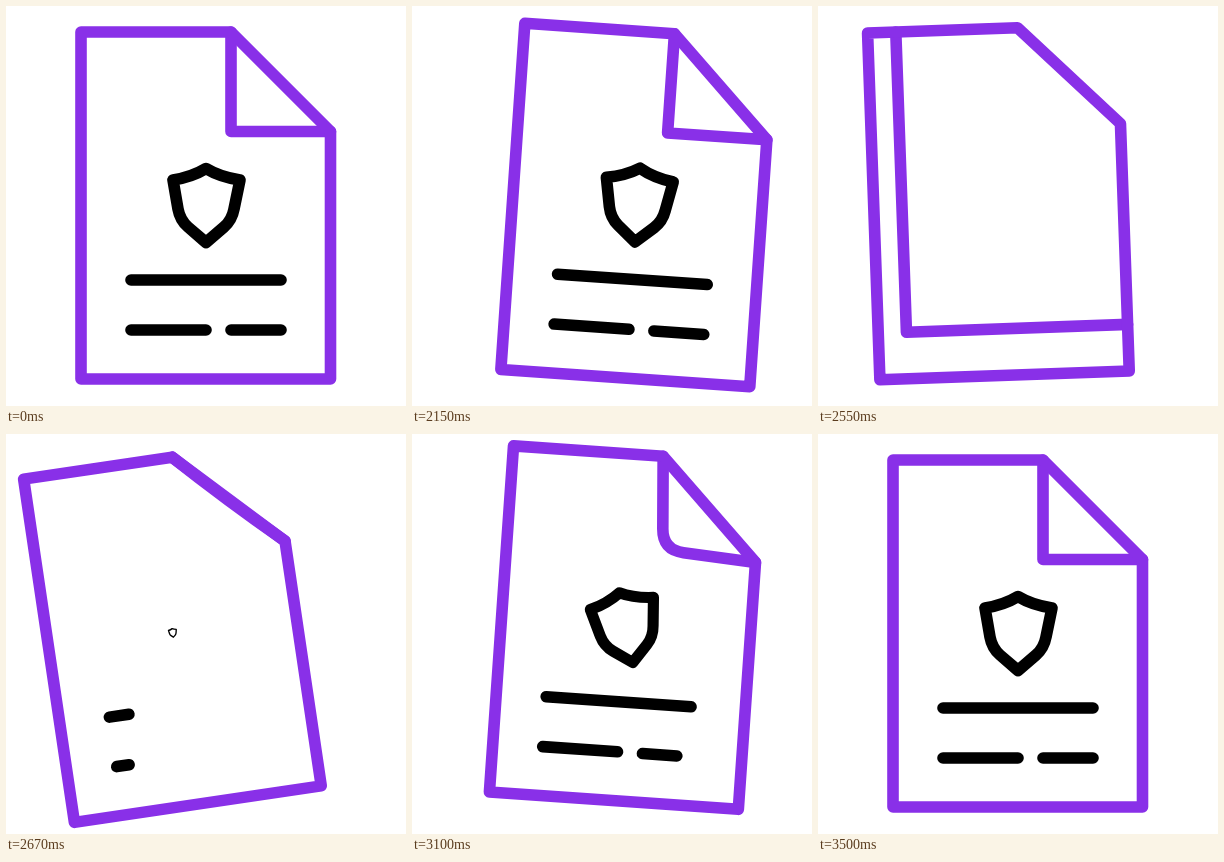
An HTML page with a canvas for the animation above (3520 ms loop, 400 px wide and 400 px high).

```html
<!DOCTYPE html>
<html lang="en">
<head>
<meta charset="utf-8">
<title>Secure document</title>
<style>
  html, body { margin: 0; width: 100%; height: 100%; overflow: hidden; background: #fff; }
  canvas { display: block; width: 100vw; height: 100vh; }
</style>
</head>
<body>
<canvas id="stage" width="400" height="400"></canvas>
<script>
const ctx = document.getElementById('stage').getContext('2d');
const LOOP = 3520, START = 2010, TURNED = 2637;
const PURPLE = '#8930e8', BLACK = '#000';
const LEFT = 75, TOP = 26, RIGHT = 324.5, BOTTOM = 373;
const FOLD_X = 225, FOLD_Y = 125.5;
const CENTER_X = (LEFT + RIGHT) / 2, CENTER_Y = (TOP + BOTTOM) / 2;

// Keyframes as [time, value]
const TRACKS = {
  x: [[1990, 0], [2330, 55.5], [2625, -33.3], [2777, -33.3], [3151, 16.6], [3500, 0]],
  y: [[1990, 0], [2330, -1], [2550, -3.5], [2850, 3.5], [3180, -7.5], [3500, 0]],
  angle: [[1990, 0], [2335, 8.8], [2712, -9], [3153, 4.5], [3500, 0]],
  turn: [[2327, 0], [TURNED, 1]],
  fold: [[2606, 0], [3239, 1]],
  round: [[2850, 1], [3212, 0]],
  shieldAngle: [[2750, 0], [3080, -15], [3500, 0]],
  shieldScale: [[TURNED, 0], [2800, 1.04], [3090, 0.96], [3500, 1]]
};

const shield = new Path2D(
  'M200 162.5Q186 171 167 174L172 203Q174 214 182 221L200 236.5' +
  'L218 221Q226 214 228 203L234 174Q214 171 200 162.5Z');

const mix = (a, b, k) => a + (b - a) * k;
const clamp = v => Math.min(1, Math.max(0, v));
const smooth = u => u * u * (3 - 2 * u);
const easeOut = (t, start, duration) => 1 - (1 - clamp((t - start) / duration)) ** 2.5;

function sample(keys, t) {
  let value = keys[0][1];
  for (let i = 1; i < keys.length; i++) {
    const [t0, v0] = keys[i - 1], [t1, v1] = keys[i];
    if (t >= t0) value = mix(v0, v1, smooth(clamp((t - t0) / (t1 - t0))));
  }
  return value;
}

function polyline(points, close) {
  ctx.beginPath();
  points.forEach(p => ctx.lineTo(...p));
  if (close) ctx.closePath();
}

function rule(x, y, length) {
  if (length <= 0) return;
  polyline([[x, y], [x + length, y]]);
  ctx.stroke();
}

function drawContent(scale, angle, first, second) {
  ctx.strokeStyle = BLACK;
  if (scale > 0) {
    ctx.save();
    ctx.translate(200, 200);
    ctx.rotate(angle * Math.PI / 180);
    ctx.scale(scale, scale);
    ctx.translate(-200, -200);
    ctx.stroke(shield);
    ctx.restore();
  }
  rule(125, 274, 150 * first);
  rule(125, 324, Math.min(75, 125 * second));
  rule(225, 324, 125 * second - 75);
}

function drawTurningFold(turn) {
  const x = mix(FOLD_X, LEFT, turn), y = mix(FOLD_Y, BOTTOM, turn);
  const edge = [[x, TOP], [x, y], [RIGHT, y]];
  polyline([...edge, [RIGHT, FOLD_Y], [FOLD_X, TOP]], true);
  ctx.fill();
  polyline(edge);
  ctx.strokeStyle = PURPLE;
  ctx.stroke();
}

function drawNewFold(fold, round) {
  const x = mix((FOLD_X + RIGHT) / 2, FOLD_X, fold);
  const y = mix((TOP + FOLD_Y) / 2, FOLD_Y, fold);
  ctx.beginPath();
  ctx.moveTo(FOLD_X, TOP);
  ctx.lineTo(mix(x, FOLD_X, round), mix(y, TOP, round));
  ctx.quadraticCurveTo(x, y, mix(x, RIGHT, round), mix(y, FOLD_Y, round));
  ctx.lineTo(RIGHT, FOLD_Y);
  ctx.strokeStyle = PURPLE;
  ctx.stroke();
}

function draw(t) {
  const at = name => sample(TRACKS[name], t);
  ctx.setTransform(1, 0, 0, 1, 0, 0);
  ctx.fillStyle = '#fff';
  ctx.fillRect(0, 0, 400, 400);
  ctx.lineWidth = 11.6;
  ctx.lineCap = ctx.lineJoin = 'round';

  if (t >= START) {
    ctx.translate(CENTER_X + at('x'), CENTER_Y + at('y'));
    ctx.rotate(at('angle') * Math.PI / 180);
    ctx.translate(-CENTER_X, -CENTER_Y);
  }

  if (t < TURNED) {
    drawContent(1, 0, 1, 1);
    drawTurningFold(at('turn'));
  } else {
    drawContent(at('shieldScale'), at('shieldAngle'),
      easeOut(t, TURNED, 620), easeOut(t, TURNED, 820));
    drawNewFold(at('fold'), at('round'));
  }

  polyline([[LEFT, TOP], [FOLD_X, TOP], [RIGHT, FOLD_Y], [RIGHT, BOTTOM], [LEFT, BOTTOM]], true);
  ctx.strokeStyle = PURPLE;
  ctx.stroke();
}

const begin = performance.now();
function frame() {
  draw((performance.now() - begin) % LOOP);
  requestAnimationFrame(frame);
}
frame();
</script>
</body>
</html>
```
